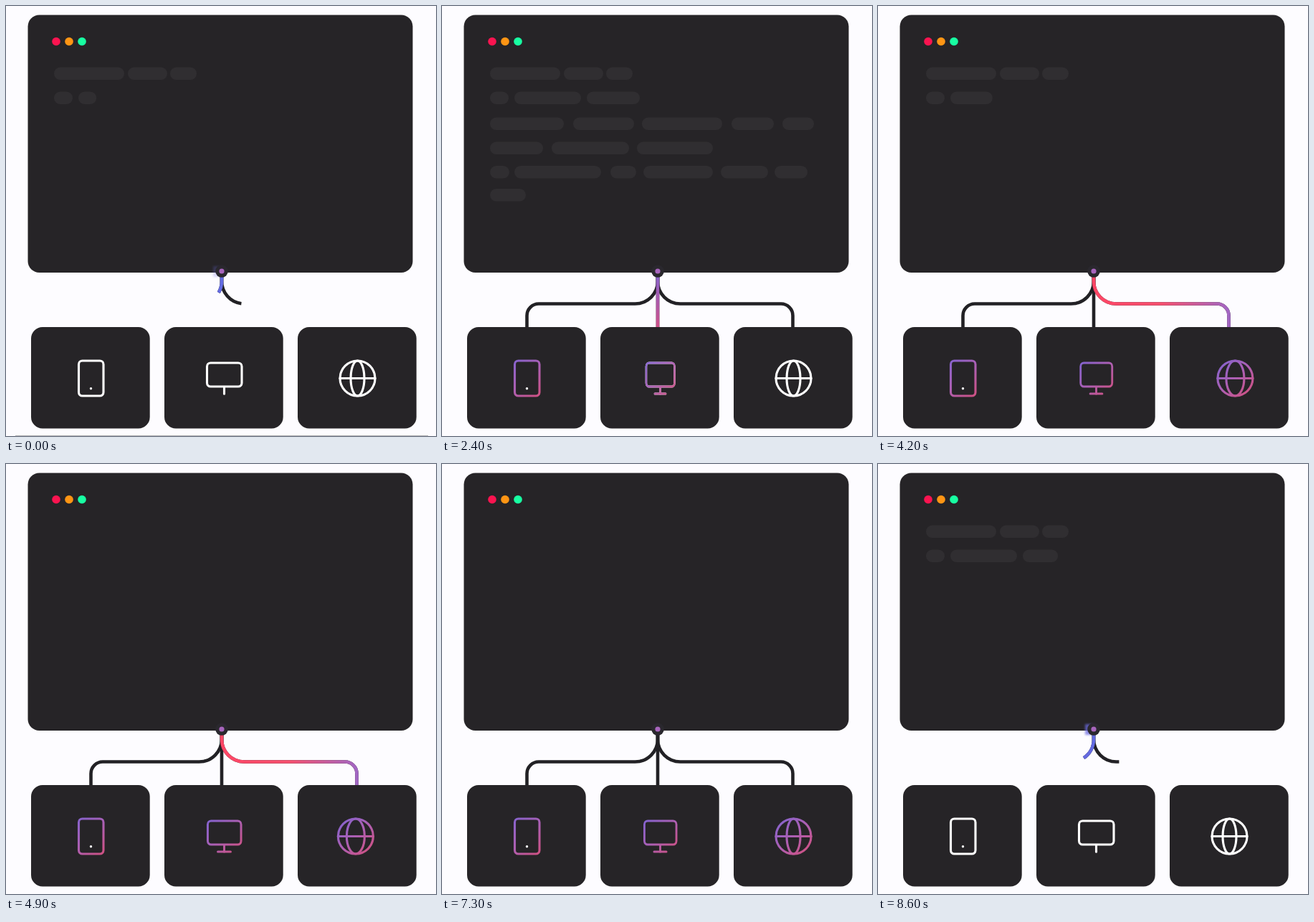
Recreate the animation shown at these times as an HTML page. Size 600 px wide and 600 px high, loop 8.7 s.

```html
<!DOCTYPE html>
<html lang="en">
<head>
<meta charset="utf-8">
<title>Devices</title>
<style>
  html, body { margin: 0; width: 100%; height: 100%; overflow: hidden; background: #fdfcff; }
  svg { display: block; width: 100vw; height: 100vh; }
  .panel { fill: #262427; }
  .pill { fill: #302e31; }
  .wire { fill: none; stroke: #222125; stroke-width: 4.6; }
  .icon { fill: none; stroke-width: 3.1; stroke-linecap: round; stroke-linejoin: round; }
  .white { stroke: #fff; }
  .tint { stroke: url(#tint); }
</style>
</head>
<body>
<svg viewBox="0 0 600 600">
  <defs>
    <linearGradient id="tint" gradientUnits="userSpaceOnUse" x1="-22" y1="-24" x2="22" y2="24">
      <stop stop-color="#8463cf"/><stop offset=".5" stop-color="#ad5fb2"/><stop offset="1" stop-color="#d1507f"/>
    </linearGradient>
    <linearGradient id="litLeft" gradientUnits="userSpaceOnUse" x1="118" y1="0" x2="303" y2="0">
      <stop stop-color="#ce5089"/><stop offset=".4" stop-color="#b45bae"/>
      <stop offset=".65" stop-color="#7868d8"/><stop offset="1" stop-color="#626be2"/>
    </linearGradient>
    <linearGradient id="litMid" gradientUnits="userSpaceOnUse" x1="0" y1="372" x2="0" y2="448">
      <stop stop-color="#8463cf"/><stop offset="1" stop-color="#ce5089"/>
    </linearGradient>
    <linearGradient id="litRight" gradientUnits="userSpaceOnUse" x1="301" y1="0" x2="490" y2="0">
      <stop stop-color="#ff4565"/><stop offset=".5" stop-color="#f6506f"/><stop offset="1" stop-color="#a267c4"/>
    </linearGradient>
    <filter id="soft" x="-50%" y="-50%" width="200%" height="200%"><feGaussianBlur stdDeviation="1.6"/></filter>
  </defs>

  <g id="scene">
    <g id="window">
      <rect class="panel" x="30.5" y="12.5" width="537" height="359.5" rx="16"/>
      <circle cx="70" cy="49.5" r="5.8" fill="#fb1450"/>
      <circle cx="88" cy="49.5" r="5.8" fill="#ff9514"/>
      <circle cx="106" cy="49.5" r="5.8" fill="#18ffa2"/>
      <g id="pills"></g>
    </g>
    <g id="wires"></g>
    <g id="hub">
      <rect id="glow" x="289" y="363" width="12" height="15" fill="#6c6be0" filter="url(#soft)"/>
      <circle cx="301" cy="370" r="8.8" fill="#2a282e"/>
      <circle cx="301" cy="370" r="3.6" fill="#a865bd"/>
    </g>
    <g id="cards"></g>
  </g>
  <rect id="edge" x="13" y="599" width="576" height="1" fill="#b4b3b6"/>
</svg>
<script>
const LOOP = 8700, RESTART = 7650, INTRO_SHIFT = 8500, TYPE_SPEED = 1.17;
const $ = id => document.getElementById(id);

function add(parent, tag, attrs) {
  const el = document.createElementNS('http://www.w3.org/2000/svg', tag);
  for (const key in attrs) el.setAttribute(key, attrs[key]);
  return parent.appendChild(el);
}

// Eased interpolation through time, value pairs.
function track(t, ...keys) {
  if (t <= keys[0]) return keys[1];
  for (let i = 2; i < keys.length; i += 2) {
    if (t < keys[i]) {
      const u = (t - keys[i - 2]) / (keys[i] - keys[i - 2]);
      return keys[i - 1] + (keys[i + 1] - keys[i - 1]) * u * u * (3 - 2 * u);
    }
  }
  return keys[keys.length - 1];
}

// Each row: y, then x and width of every pill.
const rows = [
  [85.5, 67, 98, 170, 55, 229, 37],
  [119.5, 67, 26, 101, 93, 202, 74],
  [155.5, 67, 103, 183, 85, 279, 112, 404, 59, 475, 44],
  [189.5, 67, 74, 153, 108, 272, 106],
  [223, 67, 27, 101, 121, 235, 36, 281, 97, 389, 66, 464, 46],
  [255, 67, 50]
];
const pills = [];
let textLength = 0;
for (const [y, ...spans] of rows) {
  for (let i = 0; i < spans.length; i += 2) {
    const width = spans[i + 1];
    const el = add($('pills'), 'rect', { class: 'pill', x: spans[i], y, height: 17.5, rx: 8.75 });
    pills.push({ el, width, start: textLength });
    textLength += width;
  }
}

const paths = {
  Mid: 'M301 372V448',
  Right: 'M301 372V384A31.5 31.5 0 0 0 332.5 415.5H473A16.5 16.5 0 0 1 489.5 432V448',
  Left: 'M301 372V384A31.5 31.5 0 0 1 269.5 415.5H135A16.5 16.5 0 0 0 118.5 432V448'
};
const wires = {};
for (const name in paths) {
  wires[name] = [add($('wires'), 'path', { class: 'wire', d: paths[name], pathLength: 100 })];
}
for (const name in paths) {
  wires[name].push(add($('wires'), 'path', {
    class: 'wire', d: paths[name], pathLength: 100, style: `stroke:url(#lit${name})`
  }));
}

const shapes = [
  '<rect x="-17" y="-24.5" width="34.5" height="49" rx="5"/>',
  '<rect x="-24" y="-21.5" width="48.5" height="33" rx="5"/><path class="stand" d="M0 12V21.5"/><path class="base" d="M-9 21.5H9.5"/>',
  '<circle r="24.5"/><ellipse class="meridian" ry="24.5"/><path d="M-24.5 0H24.5"/>'
];
const cards = shapes.map((shape, i) => {
  const group = add($('cards'), 'g', {});
  const x = 35 + i * 186;
  add(group, 'rect', { class: 'panel', x, y: 448, width: 165.7, height: 141.5, rx: 16 });
  const icon = add(group, 'g', { class: 'icon' });
  icon.innerHTML = `<g class="white">${shape}</g><g class="tint">${shape}</g>`;
  if (i === 0) add(icon, 'circle', { cy: 14.2, r: 1.7, fill: '#fff' });
  const [white, tint] = icon.children;
  return { group, icon, white, tint, cx: x + 83, home: [118.5, 304.5, 490.5][i] };
});
const bases = document.querySelectorAll('.base');
const meridians = document.querySelectorAll('.meridian');

function trim(name, amount, lit) {
  const [dark, bright] = wires[name];
  for (const el of [dark, bright]) {
    el.style.strokeDasharray = `${amount * 100} 200`;
    el.style.visibility = amount > 0 ? 'visible' : 'hidden';
  }
  bright.style.opacity = lit;
}

function drawText(s) {
  const typed = 240 + s * TYPE_SPEED;
  const left = 1095 - (s - 3500) * TYPE_SPEED;
  const shown = Math.min(textLength, typed, left);
  for (const { el, width, start } of pills) {
    const w = Math.max(0, Math.min(width, shown - start));
    el.setAttribute('width', w > 0 ? Math.max(w, 12) : 0);
  }
}

function drawWires(s) {
  trim('Left', track(s, -150, 0, 0, .12, 100, .18, 850, 1), track(s, 1900, 1, 2200, 0));
  trim('Mid', track(s, 120, 0, 800, 1), track(s, 2100, 0, 2350, 1, 3050, 1, 3350, 0));
  trim('Right', track(s, -200, 0, 0, .235, 100, .268, 850, 1), track(s, 3400, 0, 3650, 1, 5200, 1, 5500, 0));
  $('hub').style.opacity = track(s, -200, 0, -60, 1);
  $('glow').style.opacity = track(s, -50, 0, 0, .25, 100, .75, 250, 0);
}

function drawCards(s) {
  cards.forEach(({ group, white, tint, cx }, i) => {
    const enter = track(s, -330 + i * 40, 0, -110 + i * 40, 1);
    const scale = .8 + .2 * enter;
    group.style.opacity = enter;
    group.setAttribute('transform', `translate(${cx} 519) scale(${scale}) translate(${-cx} -519)`);
    const colour = track(s, 900 + i * 1250, 0, 1180 + i * 1250, 1);
    tint.style.opacity = colour;
    white.style.opacity = colour < 1 ? 1 : 0;
  });

  const [phone, monitor, globe] = cards;
  const lift = track(s, 900, 0, 1200, 1, 1550, 0);
  const tilt = track(s, 900, 0, 1200, 7, 1500, -6, 1800, 4, 2100, 0);
  phone.icon.setAttribute('transform', `translate(${phone.home + 5 * lift} ${519.5 - 12 * lift}) rotate(${tilt})`);

  const squeeze = track(s, 2150, 1, 2450, .8, 2800, 1, 3150, .95, 3500, .82, 3850, .96, 4300, .9, 4900, .96, 5500, .92);
  monitor.icon.setAttribute('transform', `translate(${monitor.home} 519.5) scale(${squeeze} 1)`);

  const active = track(s, 3500, 0, 4000, 1, 6300, 1, 7200, 0);
  const sway = 9 * active * Math.sin((s - 4930) / 1000 * 2 * Math.PI);
  globe.icon.setAttribute('transform', `translate(${globe.home + sway - active} 519.5)`);
  meridians.forEach(el => el.setAttribute('rx', 9.5 + 3 * active));

  const half = track(s, 100, 0, 400, 9.3);
  bases.forEach(el => el.setAttribute('d', `M${-half} 21.5H${half}`));
}

function draw(t) {
  const s = t < RESTART ? t : t - INTRO_SHIFT;
  $('scene').style.opacity = track(s, 7450, 1, RESTART, 0);
  $('window').style.opacity = track(s, -820, 0, -520, 1);
  $('edge').style.visibility = t < 100 ? 'visible' : 'hidden';
  drawText(s);
  drawWires(s);
  drawCards(s);
}

const began = performance.now();
function frame() {
  draw((performance.now() - began) % LOOP);
  requestAnimationFrame(frame);
}
frame();
</script>
</body>
</html>
```
